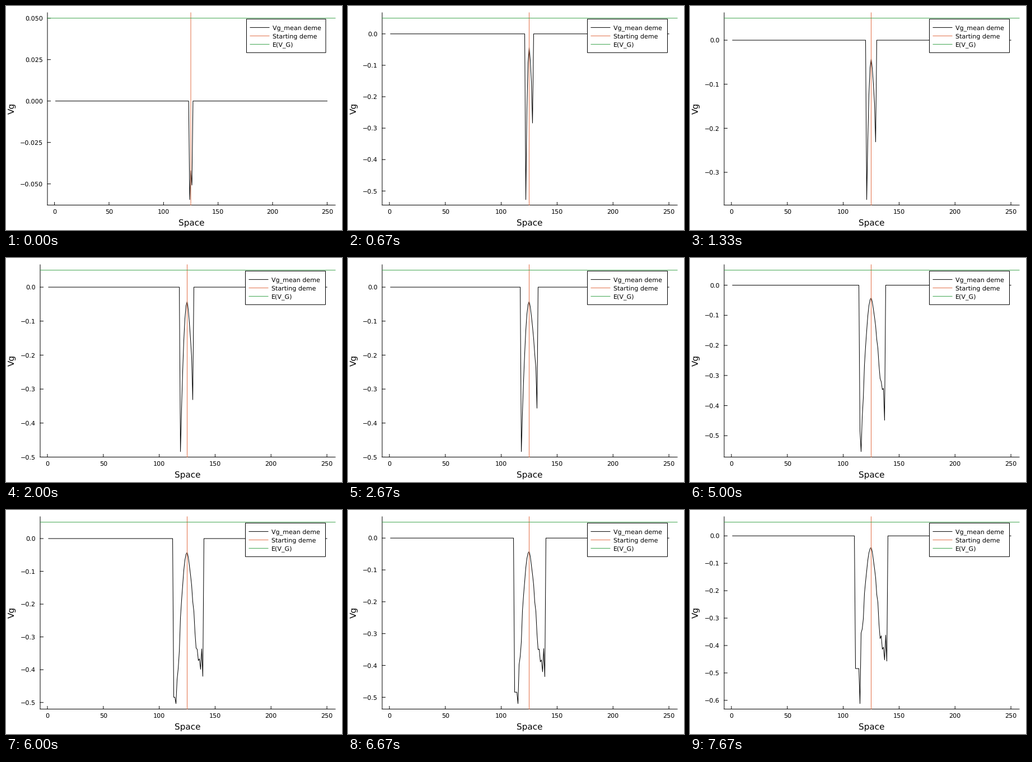
Write a matplotlib script that moves like this. It is 600x400 px and loops after 8 s.

```python
import math

import matplotlib.pyplot as plt
import numpy as np
from matplotlib.animation import FuncAnimation
from matplotlib.patches import Rectangle

plt.rcParams.update({"font.family": "DejaVu Sans", "text.hinting": "none"})

W, H, DPI = 600, 400, 100
PX = 72 / DPI
LOOP_MS, STEP_MS, GENERATIONS = 8000, 40, 24

TOP, BOTTOM, RIGHT = 12.0, 355.5, 588.0
CENTER, DEMES, START_VG = 125, 250, 0.05
CORAL, GREEN = "#e26f46", "#3da44d"

# Depth of the lowest point at a few generations.
DEPTH_KEYS = {0: .0595, 2: .5275, 4: .362, 6: .4841, 11: .4841, 12: .583,
              13: .66, 15: .553, 17: .507, 19: .5, 20: .52, 21: .485, 23: .612}
FLOOR, LIMIT = 0.042, 0.484
JITTER = np.random.default_rng(3).uniform(-1, 1, DEMES)


def lowest(gen):
    return np.interp(gen, list(DEPTH_KEYS), list(DEPTH_KEYS.values()))


def reach(gen):
    """Distance from the starting deme to the outermost occupied demes."""
    return 1 + round(1.08 * gen ** 0.8), 1 + round(min(13, 0.75 * gen))


def vg_curve(gen):
    left, right = reach(gen)
    depth = lowest(gen)
    top = min(depth, LIMIT)
    offset = np.arange(-left, right + 1)
    distance = np.abs(offset)
    demes = CENTER + offset - 1
    rough = 1 + 0.2 * JITTER[demes] * gen / GENERATIONS

    # The left flank saturates; the right one is shallower, deepest at its front.
    left_shape = (distance / min(left, 6 + gen / 6)) ** 2
    right_shape = (0.4 + 0.02 * gen) * np.minimum(distance / min(right, 9), 1) ** 1.4
    right_shape[-1] *= 1.25
    shape = np.where(offset < 0, left_shape, right_shape) * rough
    vg = FLOOR + (top - FLOOR) * np.minimum(shape, 1)
    vg[np.flatnonzero(vg == vg.max())[-1]] = depth

    values = np.zeros(DEMES)
    values[demes] = -vg
    return values


fig = plt.figure(figsize=(W / DPI, H / DPI), dpi=DPI, facecolor="white")
ax = fig.add_axes([0, 0, 1, 1])


def line(xs, ys, color="black", z=2):
    ax.plot(xs, ys, color=color, lw=PX, zorder=z, snap=False)


def label(x, y, text, size=8, ha="center", **kw):
    ax.text(x, y, text, fontsize=size, ha=ha, va="baseline",
            rotation_mode="anchor", zorder=8, **kw)


def draw_legend(decimals):
    left, right = 426.5 + decimals, 570.25 + 0.25 * decimals
    ax.add_patch(Rectangle((left, 23.3), right - left, 60, fc="white",
                           ec="black", lw=PX, zorder=6, snap=False))
    entries = [("Vg_mean deme", "black"), ("Starting deme", CORAL),
               ("E(V_G)", GREEN)]
    for i, (text, color) in enumerate(entries):
        y = 38.4 + 15 * i
        line([left + 6.5, left + 40.5], [y, y], color, z=7)
        label(left + 46.8, y + 4, text, ha="left")


def draw(frame):
    gen = ((frame + 1) * STEP_MS - 1) * GENERATIONS // LOOP_MS
    depth = lowest(gen)
    step, decimals = (0.025, 3) if depth < 0.1 else (0.1, 1)
    left = 54.5 + 6.5 * decimals

    pad = 0.03 * (DEMES - 1)
    x_min, x_max = 1 - pad, DEMES + pad
    pad = 0.03 * (START_VG + depth)
    y_min, y_max = -depth - pad, START_VG + pad

    def sx(x):
        return left + (x - x_min) / (x_max - x_min) * (RIGHT - left)

    def sy(y):
        return TOP + (y_max - y) / (y_max - y_min) * (BOTTOM - TOP)

    ax.clear()
    ax.set(xlim=(0, W), ylim=(H, 0))
    ax.axis("off")

    line([left, left], [TOP, BOTTOM])
    line([left, RIGHT], [BOTTOM, BOTTOM])
    for x in range(0, DEMES + 1, 50):
        line([sx(x)] * 2, [BOTTOM, BOTTOM - 5])
        label(sx(x), 371, str(x))
    for i in range(math.ceil(y_min / step), math.floor(y_max / step) + 1):
        y = sy(i * step)
        line([left, left + 5.5], [y, y])
        text = f"{i * step:.{decimals}f}".replace("-", "\u2212")
        label(left - 8, y + 4, text, ha="right")
    label((left + RIGHT) / 2, 391.7, "Space", size=11)
    label(15.5, (TOP + BOTTOM) / 2 - 0.7, "Vg", size=11, rotation=90)

    line(sx(np.arange(1, DEMES + 1)), sy(vg_curve(gen)), z=3)
    line([sx(CENTER)] * 2, [TOP, BOTTOM], CORAL, z=4)
    line([left, RIGHT], [sy(START_VG)] * 2, GREEN, z=5)
    draw_legend(decimals)
    return []


anim = FuncAnimation(fig, draw, frames=LOOP_MS // STEP_MS, interval=STEP_MS,
                     init_func=lambda: [], repeat=True, repeat_delay=0)
plt.show()
```
